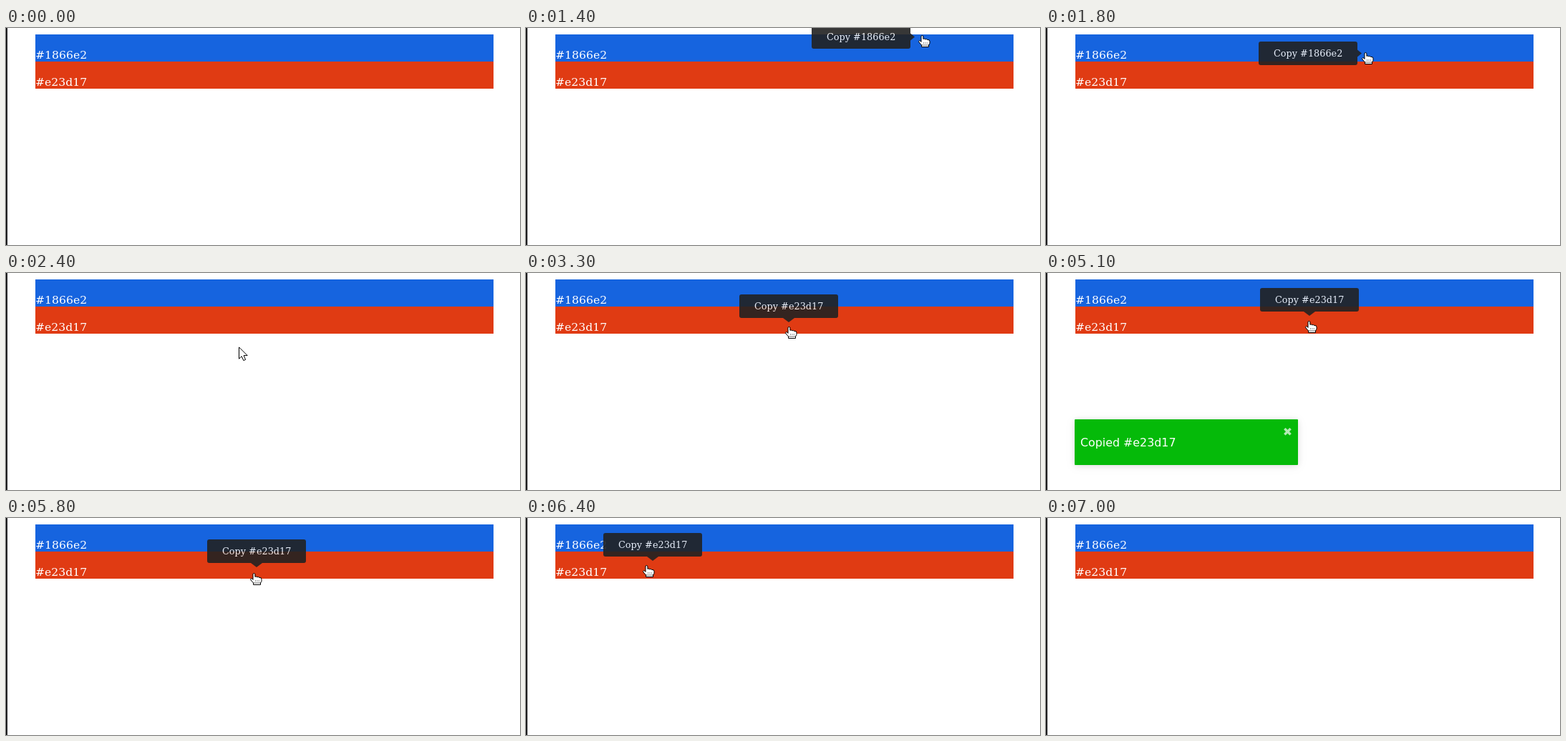
Write an HTML page that moves like this. It is 718x304 px and loops after 7.4 s.

```html
<!DOCTYPE html>
<html lang="en">
<head>
<meta charset="utf-8">
<title>Copy colours</title>
<style>
  html, body { margin: 0; width: 100%; height: 100%; overflow: hidden; background: #fff; }
  svg { display: block; }
  text { fill: #fff; white-space: pre; }
  .serif { font-family: "DejaVu Serif", serif; }
  .sans { font-family: "DejaVu Sans", sans-serif; }
  #toast .card {
    fill: #05ba09;
    filter: drop-shadow(0 1px 5px rgba(0, 0, 0, .1)) drop-shadow(0 2px 7px rgba(0, 0, 0, .05));
  }
  .cursor path { fill: #fff; stroke: #000; stroke-linejoin: round; }
  .cursor .crease { fill: none; stroke-width: .6; }
</style>
</head>
<body>
<svg width="718" height="304" viewBox="0 0 718 304">
  <rect x="41" y="9" width="640" height="38" fill="#1664df"/>
  <rect x="41" y="47" width="640" height="38" fill="#e03b13"/>
  <g class="serif" font-size="15.65">
    <text x="41" y="43">#1866e2</text>
    <text x="41" y="81">#e23d17</text>
  </g>

  <g id="toast">
    <rect class="card" y="205" width="312" height="64" rx="1"/>
    <text class="sans" x="8" y="243" font-size="15.85">Copied #e23d17</text>
    <text class="sans" x="290.8" y="227.7" font-size="16" font-weight="bold" opacity=".7">✖</text>
  </g>
  <rect width="2" height="304" fill="#1e1e20"/>

  <g id="tip" opacity=".9">
    <rect width="138" height="33" rx="3" fill="#222"/>
    <path id="tipArrow" fill="#222"/>
    <text id="tipText" class="serif" x="21" y="21" font-size="12.85"></text>
  </g>

  <g id="arrow" class="cursor">
    <path d="M.5 .9V17.2L4.2 13.7L6.8 19.6L9.6 18.4L7.1 12.6H12.2Z"/>
  </g>
  <g id="hand" class="cursor">
    <path d="M4 9.4V2Q4 .5 5.4 .5T6.9 2V5.3Q8.5 4.5 9.8 5.8Q11.5 5 12.8 6.5Q16 6 16 8.6V11.5L14.5 14V16.5H4.6V14L1 10Q0 8.2 1.5 7.7Q2.9 7.5 4 9.4Z"/>
    <path class="crease" d="M4.6 14H14.5M7.5 10.3V11.8M9.9 10.3V11.8M12.3 10.3V11.8"/>
  </g>
</svg>

<script>
const LOOP = 7400, STEP = 100;
const $ = id => document.getElementById(id);
const mix = (a, b, p) => a + (b - a) * p;
const show = (node, on) => node.setAttribute("display", on ? "inline" : "none");
const move = (node, x, y) => node.setAttribute("transform", `translate(${x} ${y})`);

function bezier(x1, y1, x2, y2) {
  const curve = (a, b, s) => 3 * a * s * (1 - s) ** 2 + 3 * b * s * s * (1 - s) + s ** 3;
  return x => {
    let low = 0, high = 1;
    for (let i = 0; i < 24; i++) {
      const mid = (low + high) / 2;
      if (curve(x1, x2, mid) < x) low = mid; else high = mid;
    }
    return curve(y1, y2, low);
  };
}
const easeOut = bezier(.215, .61, .355, 1);
const ease = bezier(.25, .1, .25, 1);

// Each key is a time followed by the values to blend
function sample(keys, t, easing = p => p) {
  if (t <= keys[0][0]) return keys[0].slice(1);
  const i = keys.findIndex(k => k[0] > t);
  if (i < 0) return keys[keys.length - 1].slice(1);
  const [a, b] = [keys[i - 1], keys[i]];
  const p = easing((t - a[0]) / (b[0] - a[0]));
  return a.slice(1).map((v, j) => mix(v, b[j + 1], p));
}

// Turning points of the pointer: time, x, y
const route = [
  [900, 704, 36], [1200, 555, 11], [1400, 554, 11], [2100, 367, 53], [2300, 363, 56],
  [2400, 325, 103], [2600, 318, 126], [2900, 368, 56], [3100, 367, 84], [3500, 368, 68],
  [5400, 368, 68], [5700, 361, 72], [5800, 347, 78], [6100, 296, 81], [6600, 84, 58], [6900, 40, 0]
];
const pointerAt = t => sample(route, t);

const bounceIn = [[0, -3000], [.6, 25], [.75, -10], [.9, 5], [1, 0]];
const bounceOut = [[0, 0], [.2, 20], [1, -2000]];

function drawToast(t) {
  const visible = t >= 4200 && t < 5400;
  show($("toast"), visible);
  if (!visible) return;
  const [offset] = t < 4900
    ? sample(bounceIn, (t - 3883) / 930, easeOut)
    : sample(bounceOut, (Math.min(t, 5200) - 4898) / 1000, ease);
  move($("toast"), Math.round(22 + offset), 0);
  $("toast").setAttribute("opacity", 1 + Math.min(0, offset) / 3000);
}

function drawTip(t) {
  // The tooltip trails the pointer slightly
  const before = pointerAt(t - STEP);
  const [x, y] = pointerAt(t).map((v, i) => mix(v, before[i], .2));
  const blue = y < 47;
  const [left, top] = blue ? [x - 155, y - 15] : [x - 69, y - 47];
  move($("tip"), Math.round(left), Math.round(top));
  $("tipArrow").setAttribute("d", blue ? "M138 11.5L144 16.5L138 21.5Z" : "M61 33H77L69 39Z");
  $("tipText").textContent = "Copy " + (blue ? "#1866e2" : "#e23d17");
}

function drawPointer(t) {
  const [x, y] = pointerAt(t).map(Math.round);
  const present = t >= 900 && t < 7000;
  const over = x >= 41 && x <= 681 && y >= 9 && y <= 85;
  const switching = (t >= 2100 && t < 2400) || t >= 6700;
  const tipOn = present && over && !switching;
  show($("hand"), present && over);
  show($("arrow"), present && !over);
  show($("tip"), tipOn);
  move($("hand"), x - 6, y - 1);
  move($("arrow"), x, y);
  if (tipOn) drawTip(t);
}

const start = performance.now();
function tick() {
  const elapsed = (performance.now() - start) % LOOP;
  const t = Math.floor(elapsed / STEP) * STEP;
  drawToast(t);
  drawPointer(t);
  requestAnimationFrame(tick);
}
tick();
</script>
</body>
</html>
```
